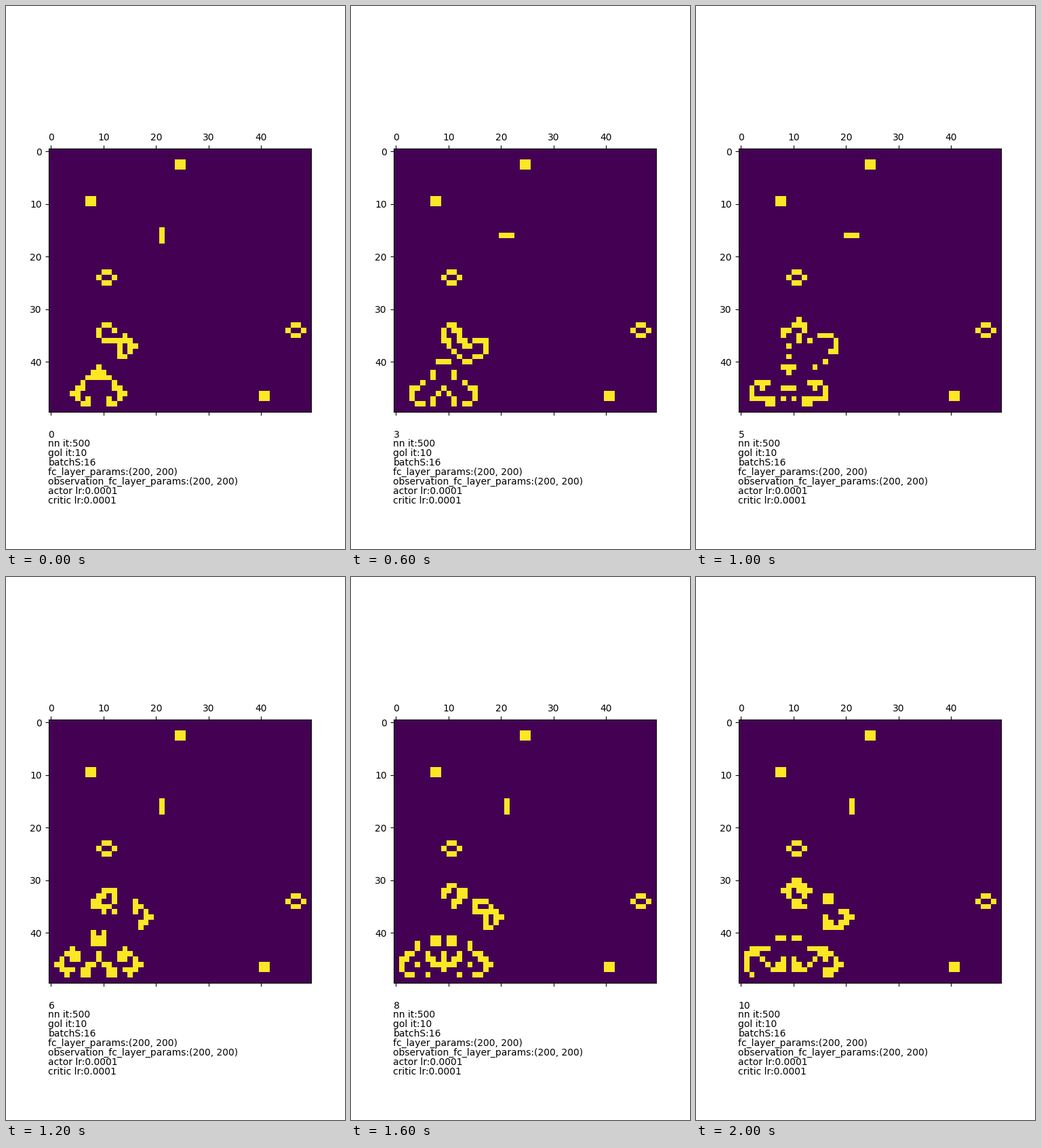
Animation of 500 by 800 pixels, one loop 8000 ms. Source, as a matplotlib script:

```python
import numpy as np
import matplotlib.pyplot as plt
from matplotlib.animation import FuncAnimation

WIDTH, HEIGHT, DPI = 500, 800, 100
SIZE = 50
GENERATIONS = 10
INTERVAL = 200
FRAMES = 40

BLOCK = "OO OO"
BLINKER = "O O O"
BEEHIVE = ".OO. O..O .OO."
HOOK = ".OO..... O..O.... O....O.. .OOOOOO. ....O.OO ....O.O. ....OO.."
ARCH = (".....O..... ....OOO.... ...OOOOO... ..O.....O.. "
        ".OO.....OO. OO.......OO .O.O...O.O. ..OO...OO..")

# (pattern, top row, left column)
SEED = [
    (BLOCK, 2, 24), (BLOCK, 9, 7), (BLOCK, 46, 40),
    (BLINKER, 15, 21),
    (BEEHIVE, 23, 9), (BEEHIVE, 33, 45),
    (HOOK, 33, 9), (ARCH, 41, 4),
]

SETTINGS = [
    "nn it:500",
    "gol it:10",
    "batchS:16",
    "fc_layer_params:(200, 200)",
    "observation_fc_layer_params:(200, 200)",
    "actor lr:0.0001",
    "critic lr:0.0001",
]


def seed_grid():
    grid = np.zeros((SIZE, SIZE), dtype=int)
    for pattern, top, left in SEED:
        for r, line in enumerate(pattern.split()):
            for c, mark in enumerate(line):
                grid[top + r, left + c] = mark == "O"
    return grid


def step(grid):
    """One Game of Life generation; the outermost cells stay dead."""
    around = sum(np.roll(grid, (dr, dc), axis=(0, 1))
                 for dr in (-1, 0, 1) for dc in (-1, 0, 1)) - grid
    inner = ((around == 3) | ((grid == 1) & (around == 2)))[1:-1, 1:-1]
    return np.pad(inner.astype(int), 1)


def write(text, baseline):
    return fig.text(0.125, 1 - baseline / HEIGHT, text, fontsize=10)


history = [seed_grid()]
for _ in range(GENERATIONS):
    history.append(step(history[-1]))

plt.rcParams["font.family"] = "DejaVu Sans"
fig, ax = plt.subplots(figsize=(WIDTH / DPI, HEIGHT / DPI), dpi=DPI)
board = ax.matshow(history[0], cmap="viridis", vmin=0, vmax=1)
counter = write("0", 636)
for i, setting in enumerate(SETTINGS):
    write(setting, 649 + 14 * i)


def update(frame):
    generation = min(frame, GENERATIONS)
    board.set_data(history[generation])
    counter.set_text(str(generation))
    return board, counter


anim = FuncAnimation(fig, update, frames=FRAMES, interval=INTERVAL,
                     repeat=True, repeat_delay=0, blit=False)
plt.show()
```
